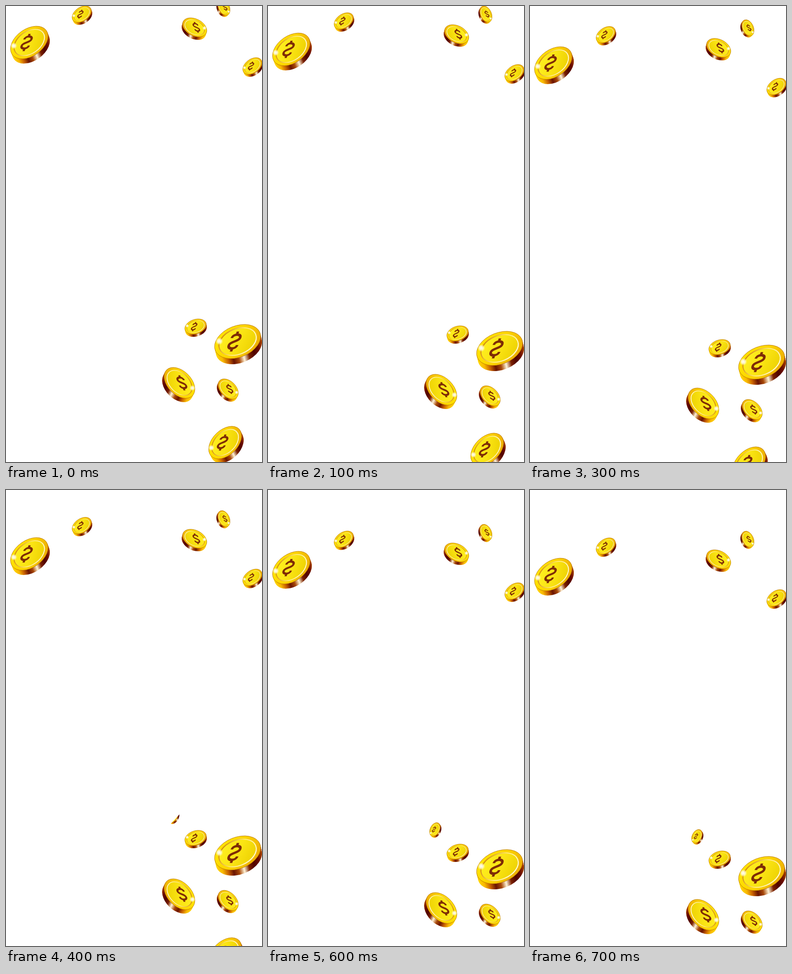
An HTML page with a canvas for the animation above (0.8 s loop, 561 px wide and 998 px high).

```html
<!DOCTYPE html>
<html lang="en">
<head>
<meta charset="utf-8">
<title>Falling coins</title>
<style>
html, body { margin: 0; width: 100%; height: 100%; overflow: hidden; background: #fff; }
canvas { display: block; }
</style>
</head>
<body>
<canvas id="stage" width="561" height="998"></canvas>
<script>
const ctx = document.getElementById('stage').getContext('2d');
const SQUASH = .65, DEPTH = .24, LEAN = .6;
const STEP_MS = 100, STEPS = 8, DROP = 15;

// centre x, y, radius, tilt in degrees
const coins = [
  [53, 85, 45.7, -35], [167, 20.5, 23.3, -34], [412.5, 50, 28.3, 27], [476, 4.5, 18.7, 65],
  [541, 134, 23.4, -35], [416, 704.5, 24.2, -18], [509, 740.5, 52.7, -22], [378, 829, 40, 45],
  [485.5, 841, 26.2, 45], [482.5, 960, 42.5, -44], [367, 654.5, 16, -63]
];

const metal = ['#ffd800', '#f8b800', '#c86000', '#6a1400', '#a84808', '#fff4d8', '#7a2000', '#500400', '#6a0c00', '#b04800'];
const rim = ['#ffe200', '#fcd400', '#eeb000'];
const face = ['#fff020', '#fae414', '#ecd000'];
const ring = ['#c87800', '#ffe870', '#fffde0'];
const shine = ['#fff', '#fffce0d0', '#fff8c000'];

const curl = new Path2D('M-.45-.4C-.45-.9 .5-.95 .5-.45C.5 0-.5 0-.5 .45C-.5 .95 .45 .9 .45 .4M0-.75V-1.15M0 .75V1.15');

function blend(gradient, colors) {
  colors.forEach((color, i) => gradient.addColorStop(i / (colors.length - 1), color));
  return gradient;
}

function oval(r, y = 0, angle = 0) {
  ctx.beginPath();
  ctx.ellipse(0, y, r, r * SQUASH, angle, 0, Math.PI * 2);
}

function drawEdge(r, angle, side) {
  const depth = r * DEPTH;
  ctx.fillStyle = blend(ctx.createLinearGradient(-r * side, 0, r * side, 0), metal);
  for (let y = depth; y > 0; y--) {
    oval(r, y, angle);
    ctx.fill();
  }
}

function drawFace(r) {
  const across = colors => blend(ctx.createLinearGradient(-r * .5, -r * .6, r * .5, r * .6), colors);
  oval(r);
  ctx.fillStyle = across(rim);
  ctx.fill();
  ctx.lineWidth = .8;
  ctx.strokeStyle = '#b87400';
  ctx.stroke();

  oval(r * .81);
  ctx.fillStyle = across(face);
  ctx.fill();
  ctx.lineWidth = r * .045;
  ctx.strokeStyle = across(ring);
  ctx.stroke();

  ctx.translate(-r * .7, -r * .3);
  ctx.fillStyle = blend(ctx.createRadialGradient(0, 0, 0, 0, 0, r * .16), shine);
  ctx.fillRect(-r * .16, -r * .16, r * .32, r * .32);
}

function drawSymbol(r) {
  ctx.translate(-r * .13, 0);
  ctx.scale(r * .36, r * .36);
  ctx.transform(1, 0, -.35, 1, 0, 0);
  ctx.lineWidth = .29;
  ctx.strokeStyle = '#7e2c06';
  ctx.stroke(curl);
}

function layer(angle, side, paint) {
  ctx.save();
  ctx.rotate(angle);
  ctx.scale(side, 1);
  paint();
  ctx.restore();
}

function drawCoin([x, y, r, tilt]) {
  const angle = tilt * Math.PI / 180;
  const lean = angle * LEAN;
  const side = tilt < 0 ? 1 : -1;
  const half = r * DEPTH / 2;

  ctx.save();
  ctx.translate(x + Math.sin(lean) * half, y - Math.cos(lean) * half);
  layer(lean, 1, () => drawEdge(r, angle - lean, side));
  layer(angle, side, () => drawFace(r));
  layer(0, side, () => drawSymbol(r));
  ctx.restore();
}

function draw(now) {
  const step = Math.floor(now / STEP_MS) % STEPS;
  ctx.clearRect(0, 0, 561, 998);
  ctx.save();
  ctx.translate(0, step * DROP);
  coins.forEach(drawCoin);
  ctx.restore();

  // the smallest coin slides out from behind this blank corner
  ctx.fillStyle = '#fff';
  ctx.fill(new Path2D('M345 748L402 686V620H345Z'));
  requestAnimationFrame(draw);
}
requestAnimationFrame(draw);
</script>
</body>
</html>
```
